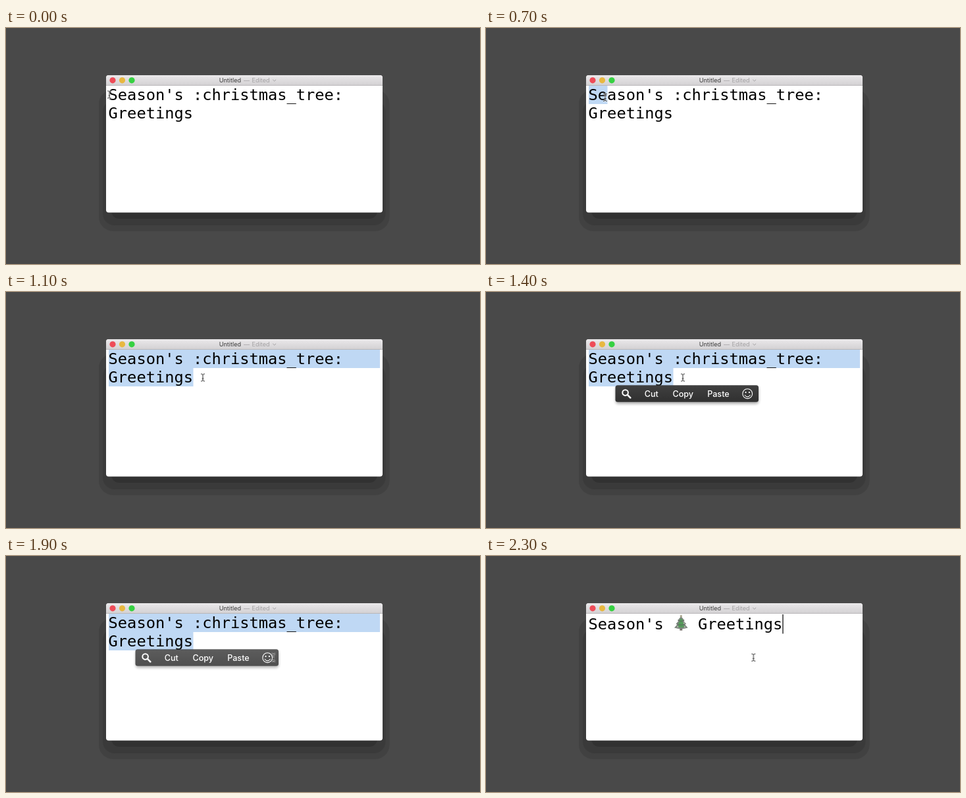
These frames come from a looping animation (720x360 px, 3800 ms). An HTML page:

```html
<!DOCTYPE html>
<html lang="en">
<head>
<meta charset="utf-8">
<title>Text replacement</title>
<style>
  html, body { margin: 0; width: 100%; height: 100%; overflow: hidden; background: #494949; }
  svg { display: block; width: 720px; height: 360px; }
  .mono { font: 23.7px "DejaVu Sans Mono", monospace; fill: #000; white-space: pre; }
  .title { font: 9.1px Inter, sans-serif; fill: #3c3c3c; }
  .title .dim { fill: #a3a1a3; }
  .menu text { font: 500 12.6px Inter, sans-serif; fill: #fff; }

  /* One step is 100 ms, 1/38 of the loop. */
  .anim { animation: 3.8s step-end infinite; }
  #before { animation-name: before; }
  #after { animation-name: after; }
  #caret { animation-name: caret; }
  #line1 { animation-name: line1; }
  #line2 { animation-name: line2; }
  #menu { animation-name: menu; }
  #pointer { animation-name: pointer; }

  @keyframes before { 0% { opacity: 1 } 60.52%, 100% { opacity: 0 } }
  @keyframes after { 0% { opacity: 0 } 60.52%, 100% { opacity: 1 } }
  @keyframes caret { 0% { opacity: 0 } 10.52% { opacity: 1 } 15.78%, 100% { opacity: 0 } }
  @keyframes line1 {
    0% { width: 0 }
    18.42% { width: 28.5px }
    21.05% { width: 412px }
    60.52%, 100% { width: 0 }
  }
  @keyframes line2 {
    0% { width: 0 }
    21.05% { width: 71.5px }
    23.68% { width: 114.5px }
    26.31% { width: 128.5px }
    60.52%, 100% { width: 0 }
  }
  @keyframes menu {
    0% { opacity: 0 }
    31.57% { opacity: .4 }
    34.21% { opacity: .88 }
    36.84% { opacity: 1 }
    50% { opacity: .85 }
    52.63% { opacity: .35 }
    55.26%, 100% { opacity: 0 }
  }
  @keyframes pointer {
    0% { transform: translate(157px, 101.5px) }
    15.78% { transform: translate(160px, 102px) }
    18.42% { transform: translate(181px, 106px) }
    21.05% { transform: translate(229px, 117px) }
    23.68% { transform: translate(278px, 126px) }
    26.31% { transform: translate(299px, 130.5px) }
    39.47% { transform: translate(321px, 135px) }
    42.1% { transform: translate(379px, 149px) }
    44.73%, 100% { transform: translate(406.3px, 154.8px) }
  }
</style>
</head>
<body>
<svg viewBox="0 0 720 360">
  <defs>
    <linearGradient id="bar" x2="0" y2="1">
      <stop offset="0" stop-color="#ebe9eb"/>
      <stop offset="1" stop-color="#d2d0d2"/>
    </linearGradient>
    <linearGradient id="dark" x2="0" y2="1">
      <stop offset="0" stop-color="#404040"/>
      <stop offset="1" stop-color="#303030"/>
    </linearGradient>
    <filter id="soft" x="-10%" y="-50%" width="120%" height="200%">
      <feGaussianBlur stdDeviation="2"/>
    </filter>
    <path id="beam" d="M-3-5.5Q0-5.5 0-4Q0-5.5 3-5.5M0-4V4M-3 5.5Q0 5.5 0 4Q0 5.5 3 5.5M-1.3 1.5H1.3" fill="none"/>
  </defs>

  <rect width="720" height="360" fill="#494949"/>

  <!-- window shadow -->
  <rect x="141" y="94" width="441.5" height="216" rx="22" fill="#414141"/>
  <rect x="147" y="110" width="429.5" height="191" rx="18" fill="#3a3a3a"/>
  <rect x="160" y="240" width="404" height="51" rx="12" fill="#313131"/>

  <!-- window -->
  <rect x="152" y="72" width="420" height="209.5" rx="4" fill="#fff"/>
  <path d="M152 88V76a4 4 0 0 1 4-4H568a4 4 0 0 1 4 4V88Z" fill="url(#bar)"/>
  <path d="M152 87.5H572" stroke="#b9b7b9"/>
  <circle cx="162" cy="79.8" r="4.6" fill="#ee4c58"/>
  <circle cx="176.5" cy="79.8" r="4.6" fill="#e8b840"/>
  <circle cx="191" cy="79.8" r="4.6" fill="#36d142"/>
  <g class="title">
    <text x="323.7" y="83.2">Untitled</text>
    <g class="dim">
      <text x="361" y="83.2">—</text>
      <text x="373.6" y="83.2">Edited</text>
    </g>
    <path d="M405.3 78.8l2.4 2.3 2.4-2.3" fill="none" stroke="#a3a1a3"/>
  </g>

  <!-- selection -->
  <g fill="#bfd8f4">
    <rect id="line1" class="anim" x="156" y="88" width="0" height="28"/>
    <rect id="line2" class="anim" x="156" y="116" width="0" height="28"/>
  </g>

  <g id="before" class="anim mono">
    <text x="155.6" y="110.3">Season's :christmas_tree:</text>
    <text x="155.6" y="138.3">Greetings</text>
  </g>
  <rect id="caret" class="anim" x="283.7" y="116" width="1.2" height="28" opacity="0"/>

  <g id="after" class="anim" opacity="0">
    <text class="mono" x="155.6" y="112">Season's</text>
    <text class="mono" x="322" y="112">Greetings</text>
    <rect x="450.4" y="89" width="1.2" height="29.5"/>
    <g transform="translate(296.3 90)">
      <rect x="-2" y="20" width="4" height="3.6" fill="#77706c"/>
      <path d="M0 2L5 8 3.5 8.6 7.5 13.3 5.5 14 10.3 19.6Q0 23-10.3 19.6L-5.5 14-7.5 13.3-3.5 8.6-5 8Z" fill="#7d877e"/>
      <path d="M0 5L2.8 8.5 1.8 9.5 4.3 13 3 14.3 5.5 18Q0 20-5.5 18L-3 14.3-4.3 13-1.8 9.5-2.8 8.5Z" fill="#559b5b"/>
      <path d="M-5 8.2Q0 11 5 8.2M-7.3 13.5Q0 17 7.3 13.5" fill="none" stroke="#59665b"/>
      <circle cy="1.7" r="1.7" fill="#aaa58c"/>
      <g fill="#c5c0bb">
        <circle cx="-5" cy="18" r="1"/>
        <circle cx="4.5" cy="12.4" r="1"/>
        <circle cx="5.5" cy="18.2" r="1"/>
      </g>
    </g>
  </g>

  <!-- popup menu -->
  <g id="menu" class="anim menu" opacity="0">
    <rect x="197" y="145" width="217" height="25.5" rx="4" opacity=".35" filter="url(#soft)"/>
    <rect x="196.5" y="142.3" width="217.5" height="25.4" rx="3.5" fill="url(#dark)"/>
    <g fill="none" stroke="#fff">
      <circle cx="211.6" cy="153.6" r="4.3" stroke-width="2"/>
      <path d="M214.9 156.9l4.4 4.4" stroke-width="2.6" stroke-linecap="round"/>
      <circle cx="397.2" cy="155.2" r="7.4" stroke-width="1.1"/>
      <path d="M392.8 157Q397.2 162.8 401.6 157" stroke-width="1.1"/>
    </g>
    <g fill="#fff">
      <circle cx="394.5" cy="153.2" r="1.1"/>
      <circle cx="399.9" cy="153.2" r="1.1"/>
    </g>
    <text x="240.8" y="160.3">Cut</text>
    <text x="283.4" y="160.3">Copy</text>
    <text x="336.2" y="160.3">Paste</text>
  </g>

  <g id="pointer" class="anim">
    <use href="#beam" stroke="#fff" stroke-width="2.4" opacity=".7"/>
    <use href="#beam" stroke="#333"/>
  </g>
</svg>
</body>
</html>
```
